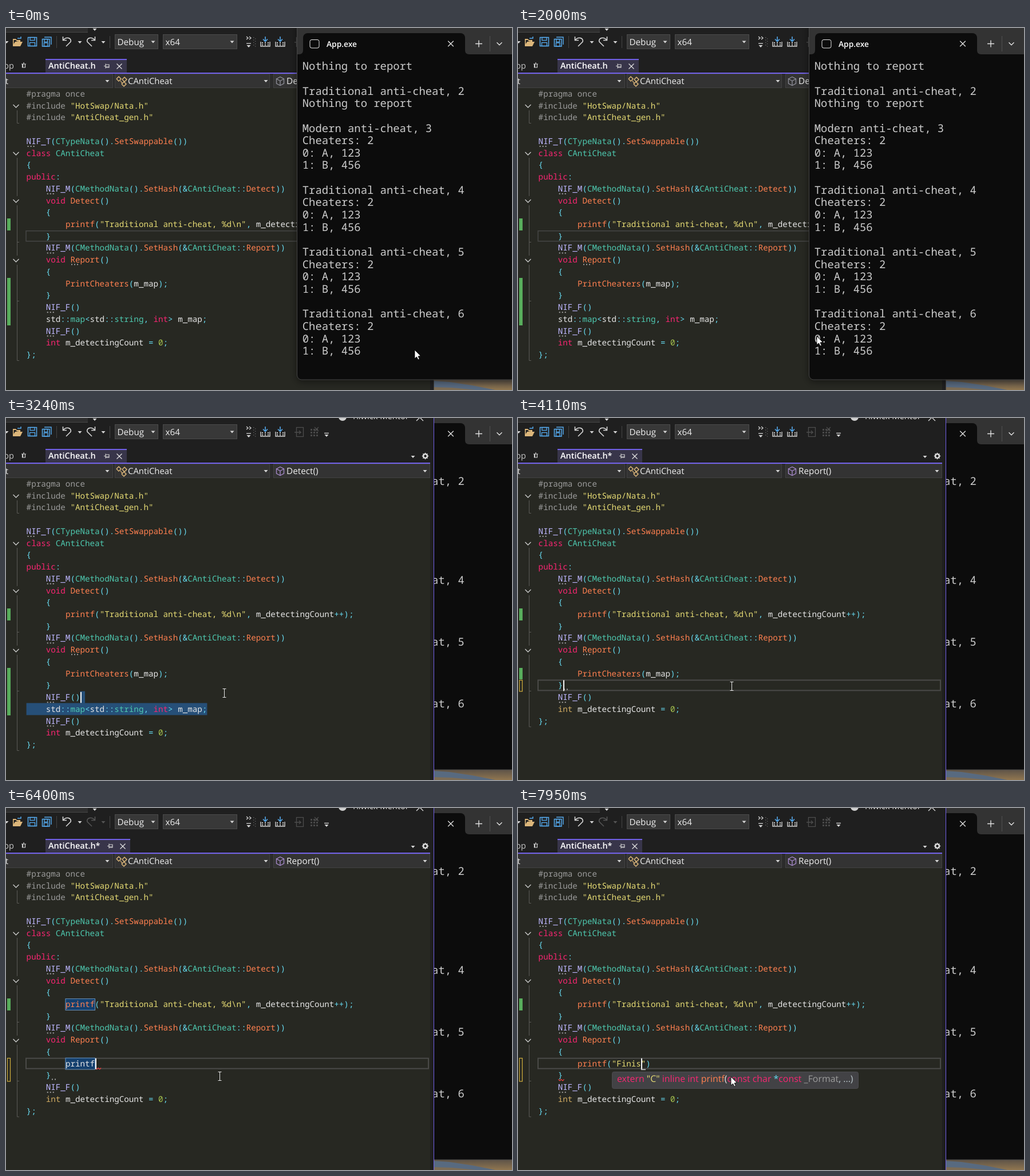
An HTML page with a canvas that plays this animation: 884x633 px, repeating every 8000 ms.

```html
<!DOCTYPE html>
<html lang="en">
<head>
<meta charset="utf-8">
<title>Live code editing</title>
<style>
  html, body { margin: 0; width: 100%; height: 100%; overflow: hidden; background: #1f1f1f; }
  canvas { display: block; }
</style>
</head>
<body>
<canvas id="stage" width="884" height="633"></canvas>
<script>
const ctx = document.getElementById('stage').getContext('2d');
const LOOP = 8000;
const RAISE = 2480, DRAG_A = 2780, DRAG_B = 3300, CUT = 4110, UP = 4480, HOME = 4820, SELECT = 4980, CLEAR = 5290;
const POPUP = 5530, FILTER = 5710, DONE = 6110, MARK = 6400, CALL = 6600, QUOTE = 7020;

const CW = 8.535, ROW = 20.73, X0 = 35.6, Y0 = 115;
const CODE = '14.225px "Noto Sans Mono", monospace';
const TERM = '18.87px "Noto Sans Mono", monospace';
const ui = (size, weight = 400) => `${weight} ${size}px "Open Sans", sans-serif`;

const C = {
  pink: '#f92672', cyan: '#66d9ef', teal: '#4ec9b0', orange: '#ff8050', macro: '#beb7ff',
  string: '#e6db74', gray: '#9b9b9b', white: '#e6e6e6', green: '#a6c34e', tan: '#d0ab62',
  purple: '#7160e8', blue: '#55aaee', edge: '#4a4a48'
};

const SOURCE = [
  '#pragma once', '#include "HotSwap/Nata.h"', '#include "AntiCheat_gen.h"', '',
  'NIF_T(CTypeNata().SetSwappable())', 'class CAntiCheat', '{', 'public:',
  '    NIF_M(CMethodNata().SetHash(&CAntiCheat::Detect))', '    void Detect()', '    {',
  '        printf("Traditional anti-cheat, %d\\n", m_detectingCount++);', '    }',
  '    NIF_M(CMethodNata().SetHash(&CAntiCheat::Report))', '    void Report()', '    {',
  '', '    }', '    NIF_F()', '    std::map<std::string, int> m_map;',
  '    NIF_F()', '    int m_detectingCount = 0;', '};'
];

const RULES = [
  [/^#.*?(?="|$)/, C.gray], [/^"[^"]*"?/, C.string], [/^NIF_\w/, C.macro],
  [/^(class|public|void|int)\b/, C.pink], [/^(C[A-Z]\w+|map|string)\b/, C.teal],
  [/^(Detect|Report|\w+(?=\())/, C.orange], [/^[A-Za-z_]\w*/, C.white],
  [/^\d+/, C.green], [/^ +/, null], [/^[^\w\s"#]+/, C.cyan]
];

const OUTPUT = ['Nothing to report', '', 'Traditional anti-cheat, 2', 'Nothing to report', ''];
for (const head of ['Modern anti-cheat, 3', ...[4, 5, 6].map(n => 'Traditional anti-cheat, ' + n)])
  OUTPUT.push(head, 'Cheaters: 2', '0: A, 123', '1: B, 456', '');

const colX = c => X0 + c * CW;
const rowY = r => Y0 + r * ROW;

function text(s, x, y, color, font, align = 'left') {
  ctx.font = font;
  ctx.fillStyle = color;
  ctx.textAlign = align;
  ctx.fillText(s, x, y);
}
function rect(x, y, w, h, fill) {
  ctx.fillStyle = fill;
  ctx.fillRect(x, y, w, h);
}
function frame(x, y, w, h, color, lw = 1) {
  ctx.strokeStyle = color;
  ctx.lineWidth = lw;
  ctx.strokeRect(x, y, w, h);
}
function path(pts, closed) {
  ctx.beginPath();
  for (let i = 0; i < pts.length; i += 2) ctx.lineTo(pts[i], pts[i + 1]);
  if (closed) ctx.closePath();
}
function line(color, lw, ...pts) {
  path(pts);
  ctx.strokeStyle = color;
  ctx.lineWidth = lw;
  ctx.stroke();
}
function shape(color, ...pts) {
  path(pts, true);
  ctx.fillStyle = color;
  ctx.fill();
}
function round(x, y, w, h, r, fill, stroke) {
  ctx.beginPath();
  ctx.roundRect(x, y, w, h, r);
  if (fill) { ctx.fillStyle = fill; ctx.fill(); }
  if (stroke) { ctx.strokeStyle = stroke; ctx.lineWidth = 1; ctx.stroke(); }
}
const tri = (x, y, color = '#d6d6d6') => shape(color, x - 3.5, y - 2, x + 3.5, y - 2, x, y + 2);
const chevron = (x, y, r, color = '#c8c8c8') => line(color, 1.4, x - r, y - r / 2, x, y + r / 2, x + r, y - r / 2);
function cross(x, y, r) {
  line('#e0e0e0', 1.3, x - r, y - r, x + r, y + r);
  line('#e0e0e0', 1.3, x - r, y + r, x + r, y - r);
}
function pin(x, y, down) {
  ctx.save();
  ctx.translate(x, y);
  if (down) ctx.rotate(Math.PI / 2);
  line('#d0d0d0', 1.2, -5, 0, -2, 0, -2, -4, -2, 4);
  line('#d0d0d0', 1.2, -2, -2.5, 4, -2.5, 4, 2.5, -2, 2.5);
  line('#d0d0d0', 1.2, -2, 1.5, 4, 1.5);
  ctx.restore();
}

function typed(t) {
  if (t < CLEAR) return 'PrintCheaters(m_map);';
  if (t < DONE) return 'prin'.slice(0, [5460, 5670, 5750, 5830].filter(k => t >= k).length);
  if (t < CALL) return 'printf';
  if (t < QUOTE) return 'printf()';
  return `printf("${'Finis'.slice(0, letters(t))}")`;
}
const letters = t => Math.max(0, Math.min(5, Math.floor((t - 7390) / 140) + 1));

function caret(t) {
  if (t < RAISE) return null;
  if (t < DRAG_A) return [19, 37];
  if (t < DRAG_B) return [18, 11];
  if (t < UP) return [17, 5];
  if (t < HOME) return [16, 5];
  if (t < SELECT) return [16, 8];
  if (t < CLEAR) return [16, 29];
  if (t < CALL) return [16, 8 + typed(t).length];
  return [16, t < QUOTE ? 15 : 16 + letters(t)];
}
function activeRow(t) {
  if (t < RAISE) return 12;
  if ((t >= DRAG_A && t < CUT) || (t >= SELECT && t < CLEAR)) return -1;
  return caret(t)[0];
}

function codeLine(s, row, t) {
  const y = rowY(row) + 5;
  for (let col = 0; col < s.length;) {
    const rest = s.slice(col);
    const [re, color] = RULES.find(([r]) => r.test(rest));
    const word = rest.match(re)[0];
    if (color) {
      const late = t >= CUT && row > 18 && word === 'int';
      text(word, colX(col), y, late ? C.tan : color, CODE);
    }
    col += word.length;
  }
}
function dots(x, y, n) {
  for (let i = 0; i < n; i++) rect(x + i * 5, y, 2, 2, '#a0a0a0');
}
function wave(x, y) {
  line('#f04040', 1.2, x, y - 1, x + 2.5, y + 1.5, x + 5, y - 1, x + 7.5, y + 1.5, x + 10, y - 1);
}
function selectCells(row, from, to) {
  rect(colX(from), rowY(row) - 10.4, (to - from) * CW, ROW + .3, '#264f78');
}

function toolbar(t) {
  rect(0, 0, 748, 105, '#1f1f1f');
  rect(0, 0, 143, 7, '#2e2e2e');
  line('#484848', 1, 0, 7.5, 143, 7.5);
  tri(155, 3);
  tri(1, 25);
  // open folder
  shape('#dcb67a', 12, 32, 12, 19, 17, 19, 19, 21, 25, 21, 25, 24, 29, 24, 25, 32);
  shape('#1f1f1f', 13.5, 28, 13.5, 21, 17, 21, 19, 23, 23, 23, 16, 24);
  line('#55aaee', 1.5, 20, 18, 26, 18, 26, 15);
  // save and save all
  const disk = (x, y, s) => {
    frame(x, y, s, s, C.blue, 1.5);
    frame(x + 3.5, y, s - 7, 5, C.blue, 1.3);
    frame(x + 3, y + s - 6, s - 6, 6, C.blue, 1.3);
  };
  disk(38.5, 16.5, 15);
  line(C.blue, 1.4, 67, 16, 79, 16, 79, 29);
  disk(63.5, 19.5, 12.5);
  line('#444', 1, 88.5, 14, 88.5, 35);
  // undo and redo
  const turn = (x, dir, color) => {
    ctx.save();
    ctx.translate(x, 24);
    ctx.scale(dir, 1);
    line(color, 1.6, -6.5, -9, -6.5, -2.5, 0, -2.5);
    ctx.beginPath();
    ctx.moveTo(-6, -3);
    ctx.bezierCurveTo(0, -10, 9, -6, 7, 0);
    ctx.lineTo(-1, 8);
    ctx.stroke();
    ctx.restore();
  };
  const redo = t < HOME ? '#d6d6d6' : '#555';
  turn(106, 1, '#d6d6d6');
  tri(129, 25);
  turn(149, -1, redo);
  tri(170, 25, redo);
  line('#444', 1, 181.5, 14, 181.5, 35);
  for (const [x, w, label] of [[190, 76, 'Debug'], [274, 130, 'x64']]) {
    rect(x, 11, w, 26, '#383838');
    frame(x + .5, 11.5, w - 1, 25, '#4b4b4b');
    text(label, x + 4.5, 29.5, '#f0f0f0', ui(15.2));
    tri(x + w - 9, 24.5);
  }
  // overflow handle, build icons
  line('#d6d6d6', 1.3, 420, 15, 423, 17.5, 420, 20);
  line('#d6d6d6', 1.3, 425, 15, 428, 17.5, 425, 20);
  line('#d6d6d6', 1.3, 420, 27, 428, 27);
  tri(424, 32);
  for (let i = 0; i < 8; i++) rect(432 + i % 2 * 3, 16 + i * 2.2, 1.3, 1.3, '#666');
  for (const x of [453, 479]) {
    line('#d0d0d0', 1.4, x - 8, 24, x - 8, 32, x + 8, 32, x + 8, 24);
    for (let i = 0; i < 6; i++) rect(x - 6 + i % 3 * 5, 25 + (i > 2) * 3.5, 2, 2, '#d0d0d0');
    line(C.blue, 1.6, x, 15, x, 23);
    line(C.blue, 1.6, x - 4, 19.5, x, 23.5, x + 4, 19.5);
  }
  frame(507.5, 16.5, 12, 16, '#4d4d4d', 1.3);
  line('#4d4d4d', 1.3, 504, 25, 515, 25, 512, 22, 515, 25, 512, 28);
  for (let i = 0; i < 9; i++) rect(532 + i % 3 * 5, 19 + Math.floor(i / 3) * 5, 3, 3, '#484848');
  line('#4d4d4d', 1.3, 539, 16, 546, 23);
  line('#4d4d4d', 1.3, 546, 16, 539, 23);
  line('#d6d6d6', 1.3, 556, 26.5, 564, 26.5);
  tri(560, 31);
  ctx.beginPath();
  ctx.arc(588, -2, 7, 0, 7);
  ctx.fillStyle = '#d0d0d0';
  ctx.fill();
  text('Tilwick Mentor', 604, 2, '#e0e0e0', ui(14.7));
  line('#d0d0d0', 1.4, 717, 5, 723, -1, 729, 5);
}

function tabs(t) {
  const dirty = t >= CUT, shift = dirty ? 6 : 0;
  text('App.cpp', 14, 71, '#c4c4c4', ui(14.6), 'right');
  pin(31, 65, true);
  rect(69, 54, 142 + shift, 25, '#38354a');
  line(C.purple, 2, 69, 55, 211 + shift, 55);
  text('AntiCheat.h' + (dirty ? '*' : ''), 74, 71, '#fff', ui(14.5, 600));
  pin(176 + shift, 66.5);
  cross(198 + shift, 67, 4.5);
  tri(711, 68);
  ctx.beginPath();
  ctx.arc(732.5, 66.5, 3.4, 0, 7);
  ctx.strokeStyle = '#e0e0e0';
  ctx.lineWidth = 2.4;
  ctx.stroke();
  for (let a = 0; a < 8; a++) {
    const c = Math.cos(a * Math.PI / 4), s = Math.sin(a * Math.PI / 4);
    line('#e0e0e0', 1.6, 732.5 + c * 4, 66.5 + s * 4, 732.5 + c * 5.7, 66.5 + s * 5.7);
  }
  rect(0, 78, 741, 2, C.purple);

  rect(0, 80, 741, 25, '#2b2b2b');
  for (const [x, w] of [[-2, 189], [190, 271], [467, 274]]) {
    rect(x, 81, w, 23, '#333');
    frame(x + .5, 80.5, w - 1, 24, '#424242');
  }
  tri(177, 93); tri(454, 93); tri(732, 93);
  text('t', 4, 98, '#e8e8e8', ui(15), 'right');
  for (const [x, y] of [[197, 89], [207, 90], [206, 98]]) {
    line('#dcb67a', 1.5, x - 4, y, x, y - 4, x + 4, y, x, y + 4, x - 4, y);
  }
  line('#dcb67a', 1.3, 200, 92, 203, 97);
  text('CAntiCheat', 213, 98, '#f0f0f0', ui(14.9));
  const cube = t < RAISE ? '#8c8c96' : '#a488c8';
  line(cube, 1.4, 472.5, 89, 479, 85.5, 485.5, 89, 485.5, 97, 479, 100.5, 472.5, 97, 472.5, 89, 479, 92.5, 485.5, 89);
  line(cube, 1.4, 479, 92.5, 479, 100.5);
  text(t < 3450 ? 'Detect()' : 'Report()', 490, 98, '#f0f0f0', ui(15.3));
}

function gutter(t) {
  const end = t < CUT ? 581.5 : 540, c = '#5a5a56';
  line(c, 1, 19.5, 144, 19.5, 166.5, 23, 166.5);
  line(c, 1, 19.5, 227, 19.5, 294);
  line(c, 1, 19.5, 310, 19.5, 398);
  line(c, 1, 19.5, 414, 19.5, end, 23, end);
  line(c, 1, 19.5, 374.5, 23, 374.5);
  line(c, 1, 19.5, 477.5, 23, 477.5);
  for (const y of [136.5, 219.5, 302.5, 406.5]) chevron(17.5, y, 5);

  const green = '#58ad5c';
  rect(2, 333, 6, 21, green);
  if (t < CUT) rect(2, 437, 6, 83, green);
  else if (t < CLEAR) rect(2, 437, 6, 20, green);
  if (t >= CUT) {
    const top = t < CLEAR ? 458.5 : 437.5;
    frame(2.5, top, 5, 478 - top, '#d0ae3c', 1.2);
  }
}

function editor(t) {
  rect(0, 0, 748, 633, '#1f1f1f');
  toolbar(t);
  tabs(t);
  rect(0, 105, 741, 528, '#272822');
  gutter(t);

  const active = activeRow(t);
  if (active >= 0) frame(35, rowY(active) - 9, 703, 18, t < RAISE ? '#464645' : C.edge, t < RAISE ? 1.5 : 2);
  if (t >= DRAG_A && t < CUT) {
    selectCells(19, 0, 37);
    if (t < DRAG_B) selectCells(18, 11, 12);
    else { selectCells(18, 0, 12); selectCells(17, 5, 6); }
  }
  if (t >= SELECT && t < CLEAR) selectCells(16, 8, 29);
  if (t >= MARK && t < CALL) {
    for (const r of [11, 16]) {
      rect(103.5, rowY(r) - 10, 52.5, 20, '#14406e');
      frame(104, rowY(r) - 9.5, 51.5, 20, '#6a8fb5');
    }
  }

  const lines = SOURCE.slice();
  lines[16] = ' '.repeat(8) + typed(t);
  if (t >= CUT) lines.splice(18, 2);
  lines.forEach((s, r) => {
    codeLine(s, r, t);
    const at = s.indexOf('NIF');
    if (at >= 0) dots(colX(at) + 2, rowY(r) + 8, 3);
  });
  if (t < HOME) dots(114, 412.5, 3);
  if (t >= CUT && t < 7460) dots(80, 473.5, 2);
  if (t >= 5460 && t < 6430) wave(colX(8 + typed(t).length) + 1, 455.5);
  if (t >= 6430) wave(70.5, 475.5);

  const c = caret(t);
  if (c) {
    const x = Math.round(colX(c[1]) + .5);
    rect(x, rowY(c[0]) - 9, 2, 19, '#f4f4f4');
    if (t >= CALL) rect(x, rowY(16) + 10, 8, 1.5, '#d0d0d0');
  }
  rect(741, 105, 6, 528, '#1f1f1f');
  rect(747, 0, 1, 633, t < RAISE ? '#454545' : C.purple);
}

function terminal(front) {
  ctx.save();
  if (front) { ctx.shadowColor = 'rgba(0,0,0,.5)'; ctx.shadowBlur = 14; ctx.shadowOffsetY = 3; }
  round(508.5, -10, 400, 625, 8, '#0c0c0c');
  ctx.restore();
  ctx.save();
  ctx.beginPath();
  ctx.roundRect(508.5, -10, 400, 625, 8);
  ctx.clip();
  rect(508, 0, 376, 46, '#333');
  round(519, 9, 283, 45, 8, '#0c0c0c');
  for (const [x, s] of [[519, -1], [802, 1]]) {
    ctx.beginPath();
    ctx.moveTo(x, 39);
    ctx.quadraticCurveTo(x, 46, x + s * 7, 46);
    ctx.lineTo(x, 46);
    ctx.fill();
  }
  round(531, 20.5, 16, 14.5, 3, null, '#e6e6e6');
  text('App.exe', 560, 33, '#fff', ui(13.8, 600));
  cross(777, 27.5, 4.8);
  line('#e0e0e0', 1.4, 820, 27.5, 832, 27.5);
  line('#e0e0e0', 1.4, 826, 21.5, 826, 33.5);
  line('#505050', 1, 845.5, 14, 845.5, 41);
  chevron(862, 27.5, 4.5, '#e0e0e0');
  OUTPUT.forEach((s, i) => text(s, 517.8, 73.2 + i * 21.66, '#cccccc', TERM));
  ctx.restore();
  round(508.5, -10, 400, 625, 8, null, '#464646');
}

function wallpaper() {
  const g = ctx.createLinearGradient(0, 615, 0, 633);
  g.addColorStop(0, '#5d5348');
  g.addColorStop(1, '#907650');
  rect(748, 600, 136, 33, g);
  shape('#586a80', 748, 617, 775, 619, 815, 625, 855, 633, 748, 633);
  shape('#7c6c55', 748, 628, 780, 629, 822, 633, 748, 633);
}

function popupIcon(kind, x, y) {
  if (kind === 'op') {
    round(x - 8, y - 8, 16, 16, 1, '#173a58', C.blue);
    line(C.blue, 1.3, x - 5, y - 4, x, y - 4);
    line(C.blue, 1.3, x - 2.5, y - 6.5, x - 2.5, y - 1.5);
    line(C.blue, 1.3, x + 2, y - 4, x + 6, y - 4);
    line(C.blue, 1.3, x - 5, y + 4, x - 1, y + 4);
    line(C.blue, 1.3, x + 2, y + 3, x + 6, y + 3, x + 2, y + 6, x + 6, y + 6);
  } else if (kind === 'key') {
    line('#c8c8c8', 1.4, x - 9, y - 2, x + 1, y - 2);
    line('#c8c8c8', 1.4, x - 9, y + 2, x + 9, y + 2);
    line('#c8c8c8', 1.4, x - 9, y + 6, x + 3, y + 6);
    frame(x - 3, y - 8, 10, 4, C.blue, 1.3);
    line('#c8c8c8', 1.4, x + 3, y - 1, x + 9, y - 1);
  } else if (kind === 'macro') {
    line(C.blue, 1.4, x - 7, y - 6, x - 7, y + 6);
    line(C.blue, 1.4, x - 3, y - 6, x + 4, y, x - 3, y + 6, x - 3, y - 6);
    line(C.blue, 1.4, x + 7, y - 6, x + 7, y + 6);
  } else {
    line('#b48ee0', 1.4, x - 6, y - 3, x, y - 7, x + 6, y - 3, x + 6, y + 4, x, y + 7, x - 6, y + 4, x - 6, y - 3, x, y, x + 6, y - 3);
    line('#b48ee0', 1.4, x, y, x, y + 7);
  }
}

const WIDE = [['op', 'operator delete[]'], ['op', 'operator new'], ['op', 'operator new[]'],
  ['key', 'partial'], ['key', 'pascal'], ['macro', 'PC_24'], ['macro', 'PC_53']];
const NARROW = [['fn', 'PrintCheaters'], ['fn', 'printf'], ['fn', 'printf_s'], ['key', 'private'],
  ['fn', 'fprintf'], ['fn', 'fprintf_s'], ['fn', 'sprintf']];

function popup(t) {
  const narrow = t >= FILTER, key = narrow ? typed(t) : 'p';
  rect(106, 461, 550, 172, '#1f1f1f');
  rect(634, 461, 22, 172, '#2e2e2e');
  shape('#9a9a9a', 639, 476.5, 650, 476.5, 644.5, 470);
  rect(638.5, 495, 11.5, 11, '#4d4d4d');
  frame(133.5, (narrow ? 1 : 3) * 23.85 + 462.5, 499, 22, '#484848');
  (narrow ? NARROW : WIDE).forEach(([kind, name], i) => {
    const y = 474 + i * 23.85;
    popupIcon(kind, 117, y);
    const at = name.toLowerCase().indexOf(key);
    let x = 134;
    for (const [part, weight] of [[name.slice(0, at), 400], [name.slice(at, at + key.length), 700], [name.slice(at + key.length), 400]]) {
      text(part, x, y + 5.5, '#f0f0f0', ui(15.7, weight));
      x += ctx.measureText(part).width;
    }
  });
}

function tooltip() {
  round(164.5, 461.5, 430, 29, 3, '#424245', '#4c4c4f');
  let x = 173;
  for (const [s, color] of [['extern ', C.pink], ['"C" ', C.string], ['inline int ', C.pink], ['printf', C.orange],
    ['(', C.white], ['const char ', C.pink], ['*', C.cyan], ['const ', C.pink], ['_Format', C.gray], [', ...)', '#b8c4c8']]) {
    text(s, x, 478.5, color, ui(15.9));
    x += ctx.measureText(s).width;
  }
}

const TRACK = [[1330, 714, 563], [2000, 522, 539], [2130, 482, 530], [2450, 403, 507],
  [2600, 403, 507], [2960, 386, 488], [3700, 373, 469]];
function pointer(t) {
  let [, x, y] = TRACK[0];
  for (let i = 1; i < TRACK.length; i++) {
    const [ta, xa, ya] = TRACK[i - 1], [tb, xb, yb] = TRACK[i];
    const p = Math.max(0, Math.min(1, (t - ta) / (tb - ta)));
    if (p > 0) { x = xa + (xb - xa) * p; y = ya + (yb - ya) * p; }
  }
  x = Math.round(x);
  y = Math.round(y);
  const arrow = (t < RAISE && x > 508) || (t >= POPUP && t < DONE) || t >= CALL;
  if (arrow) {
    if (t > RAISE) { x--; y++; }
    const tip = [x, y, x, y + 15, x + 3.5, y + 12, x + 6, y + 17, x + 8.3, y + 16, x + 6, y + 11, x + 10.5, y + 10.5];
    shape('#fff', ...tip);
    path(tip, true);
    ctx.strokeStyle = '#000';
    ctx.lineWidth = .8;
    ctx.stroke();
  } else {
    x += .5;
    line('#e8e8e8', 1, x, y - 7, x, y + 7);
    for (const s of [-7.5, 7.5]) line('#e8e8e8', 1, x - 3, y + s, x + 3, y + s);
  }
}

function draw(t) {
  ctx.textRendering = 'geometricPrecision';
  wallpaper();
  if (t < RAISE) {
    editor(t);
    terminal(true);
  } else {
    terminal(false);
    editor(t);
  }
  if (t >= POPUP && t < DONE) popup(t);
  if (t >= CALL) tooltip();
  pointer(t);
}

const start = performance.now();
function tick() {
  draw((performance.now() - start) % LOOP);
  requestAnimationFrame(tick);
}
tick();
</script>
</body>
</html>
```
